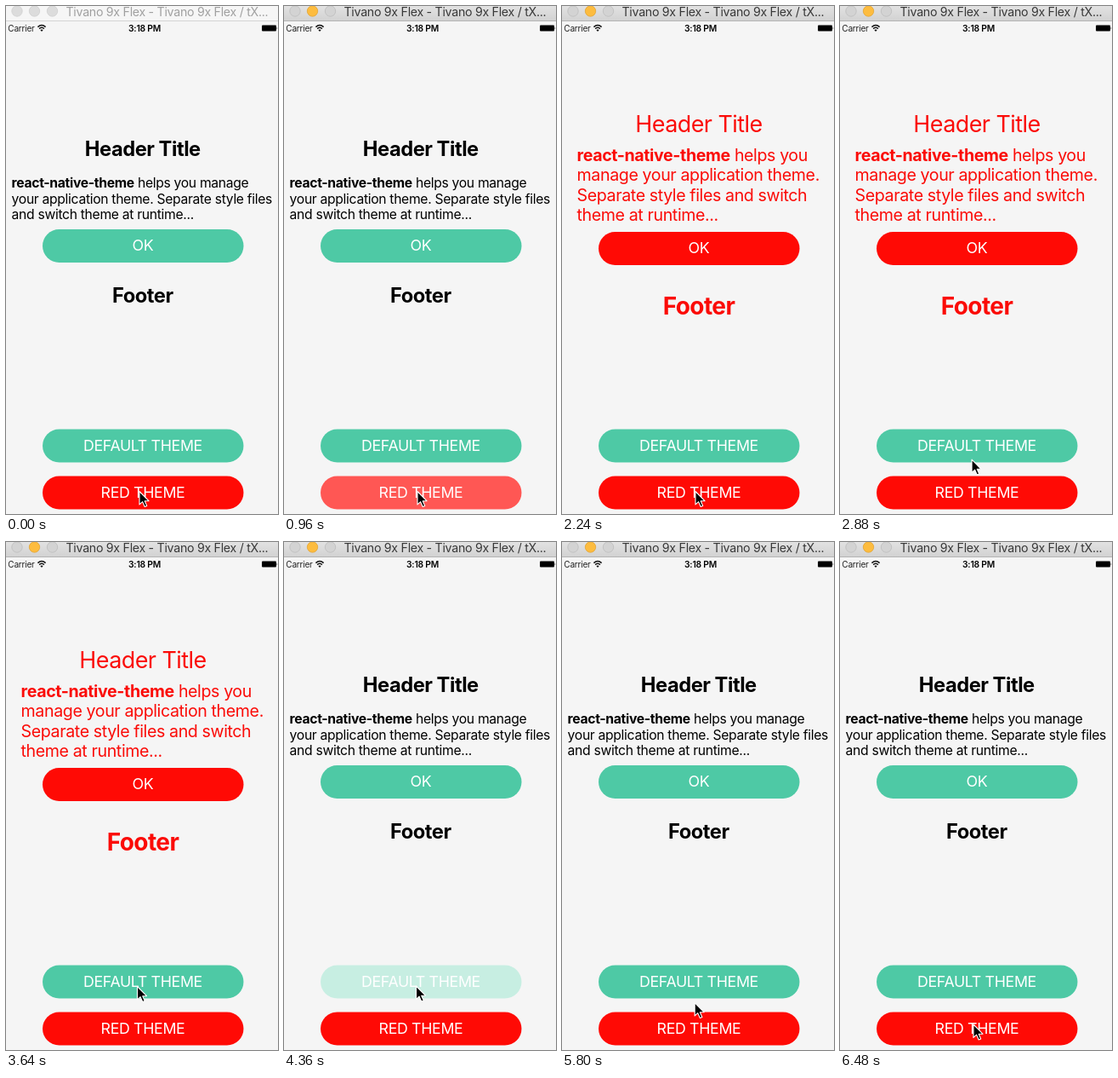
Recreate the animation shown at these times as an HTML page. Size 320 by 596 pixels, loop 6.52 s.

```html
<!DOCTYPE html>
<html lang="en">
<head>
<meta charset="utf-8">
<title>Theme switcher</title>
<style>
  html, body { margin: 0; width: 100%; height: 100%; overflow: hidden; background: #f5f5f5; }
  svg { display: block; width: 100vw; height: 100vh; }
  text { font-family: Inter, "Open Sans", sans-serif; letter-spacing: -.02em; white-space: pre; }
  .mid { text-anchor: middle; }
  .bold { font-weight: 700; }
  .label { font-size: 17.8px; fill: #fff; text-anchor: middle; }
</style>
</head>
<body>
<svg viewBox="0 0 320 596">
  <defs>
    <linearGradient id="chrome" x2="0" y2="1">
      <stop stop-color="#e2e2e2"/>
      <stop offset="1" stop-color="#d2d2d2"/>
    </linearGradient>
    <rect id="pill" x="43" width="236.5" height="39" rx="19.5"/>
  </defs>
  <rect width="320" height="596" fill="#f5f5f5"/>

  <g id="titleBar">
    <rect id="bar" width="320" height="17"/>
    <path id="barEdge" d="M0 17.5H320"/>
    <g id="lights" stroke-width=".8">
      <circle cx="13" cy="6" r="6.2"/>
      <circle cx="33.5" cy="6" r="6.2"/>
      <circle cx="54.5" cy="6" r="6.2"/>
    </g>
    <text id="barText" x="70.5" y="11.5" font-size="14.2">Tivano 9x Flex - Tivano 9x Flex / tX...</text>
  </g>

  <g id="statusBar">
    <text x="2.3" y="29.5" font-size="10" fill="#222">Carrier</text>
    <g fill="none" stroke="#111" stroke-width="1.5">
      <path d="M37.4 24.6Q42 20.4 46.6 24.6M39.1 26.6Q42 24 44.9 26.6"/>
    </g>
    <path d="M40.3 28.1Q42 26.7 43.7 28.1L42 30Z" fill="#111"/>
    <text class="mid" x="163" y="29.5" font-size="10.3" font-weight="600">3:18 PM</text>
    <rect x="301" y="22.6" width="17" height="6.8" rx="1"/>
    <path d="M318.7 24.8q1.2 1.3 0 2.6z"/>
  </g>

  <g id="defaultView">
    <text class="mid bold" x="160.8" y="176" font-size="23.7">Header Title</text>
    <g font-size="15.7">
      <text x="6.6" y="212.6"><tspan class="bold">react-native-theme</tspan> helps you manage</text>
      <text x="6.6" y="231.5">your application theme. Separate style files</text>
      <text x="6.6" y="250.4">and switch theme at runtime...</text>
    </g>
    <use href="#pill" y="262" fill="#4ec9a5"/>
    <text class="label" x="161" y="287.4">OK</text>
    <text class="mid bold" x="160.8" y="347.5" font-size="23.7">Footer</text>
  </g>

  <g id="redView" fill="#fb0b07">
    <text class="mid" x="161" y="148" font-size="26.9">Header Title</text>
    <g font-size="19.6">
      <text x="17.6" y="181.6"><tspan class="bold">react-native-theme</tspan> helps you</text>
      <text x="17.6" y="205.2">manage your application theme.</text>
      <text x="17.6" y="228.8">Separate style files and switch</text>
      <text x="17.6" y="252.4">theme at runtime...</text>
    </g>
    <use href="#pill" y="265" fill="#ff0a05"/>
    <text class="label" x="161" y="290.4">OK</text>
    <text class="mid bold" x="161" y="362" font-size="28">Footer</text>
  </g>

  <use href="#pill" y="496.5" fill="#fff"/>
  <g id="defaultButton">
    <use href="#pill" y="496.5" fill="#4ec9a5"/>
    <text class="label" x="161" y="521.8">DEFAULT THEME</text>
  </g>
  <use href="#pill" y="551.5" fill="#fff"/>
  <g id="redButton">
    <use href="#pill" y="551.5" fill="#ff0a05"/>
    <text class="label" x="161" y="576.8">RED THEME</text>
  </g>

  <path id="cursor" d="M0 0V15.4L3.6 12.1L6.2 18L8.7 16.9L6.2 11.2H11Z"
        stroke="#fff" stroke-width="1.1" stroke-linejoin="round"/>
</svg>
<script>
  const LOOP = 6520;
  const ACTIVATE = 840;
  const RED_PRESS = { down: 894, up: 1080 };
  const DEFAULT_PRESS = { down: 4130, up: 4295 };
  const PRESSED_OPACITY = 0.2;

  // time, x, y of the pointer tip
  const POINTER = [
    [0, 157, 569.5], [2480, 157, 569.5], [3080, 154.5, 521.5],
    [3640, 154.5, 521.5], [4100, 155.5, 521], [5520, 155.5, 521],
    [6120, 157, 565.5], [6480, 157, 566], [LOOP, 157, 569.5]
  ];

  const el = id => document.getElementById(id);
  const set = (node, attrs) => {
    for (const name in attrs) node.setAttribute(name, attrs[name]);
  };
  const ease = p => {
    const c = Math.min(1, Math.max(0, p));
    return c < 0.5 ? 2 * c * c : 1 - 2 * (1 - c) ** 2;
  };
  const lights = [...el('lights').children];

  function pressOpacity(t, { down, up }) {
    const fade = ease((t - down) / 150) - ease((t - up) / 250);
    return 1 - (1 - PRESSED_OPACITY) * fade;
  }

  function pointerAt(t) {
    const next = POINTER.findIndex(point => point[0] > t);
    const [t0, x0, y0] = POINTER[next - 1];
    const [t1, x1, y1] = POINTER[next];
    const p = ease((t - t0) / (t1 - t0));
    return [x0 + (x1 - x0) * p, y0 + (y1 - y0) * p];
  }

  function drawTitleBar(active) {
    set(el('bar'), { fill: active ? 'url(#chrome)' : '#f6f6f6' });
    set(el('barEdge'), { stroke: active ? '#b4b4b4' : '#d3d3d3' });
    set(el('barText'), { fill: active ? '#383838' : '#a0a0a0' });
    lights.forEach((light, i) => {
      const lit = active && i === 1;
      set(light, {
        fill: lit ? '#fdbc3f' : active ? '#d3d3d3' : '#dcdcdc',
        stroke: lit ? '#e2a537' : active ? '#bdbdbd' : '#d0d0d0'
      });
    });
  }

  function render(t) {
    const red = t >= RED_PRESS.up && t < DEFAULT_PRESS.up;
    drawTitleBar(t >= ACTIVATE);
    set(el('defaultView'), { display: red ? 'none' : 'inline' });
    set(el('redView'), { display: red ? 'inline' : 'none' });
    set(el('redButton'), { opacity: pressOpacity(t, RED_PRESS) });
    set(el('defaultButton'), { opacity: pressOpacity(t, DEFAULT_PRESS) });
    set(el('cursor'), { transform: `translate(${pointerAt(t)})` });
  }

  const start = performance.now();
  function tick() {
    render((performance.now() - start) % LOOP);
    requestAnimationFrame(tick);
  }
  tick();
</script>
</body>
</html>
```
